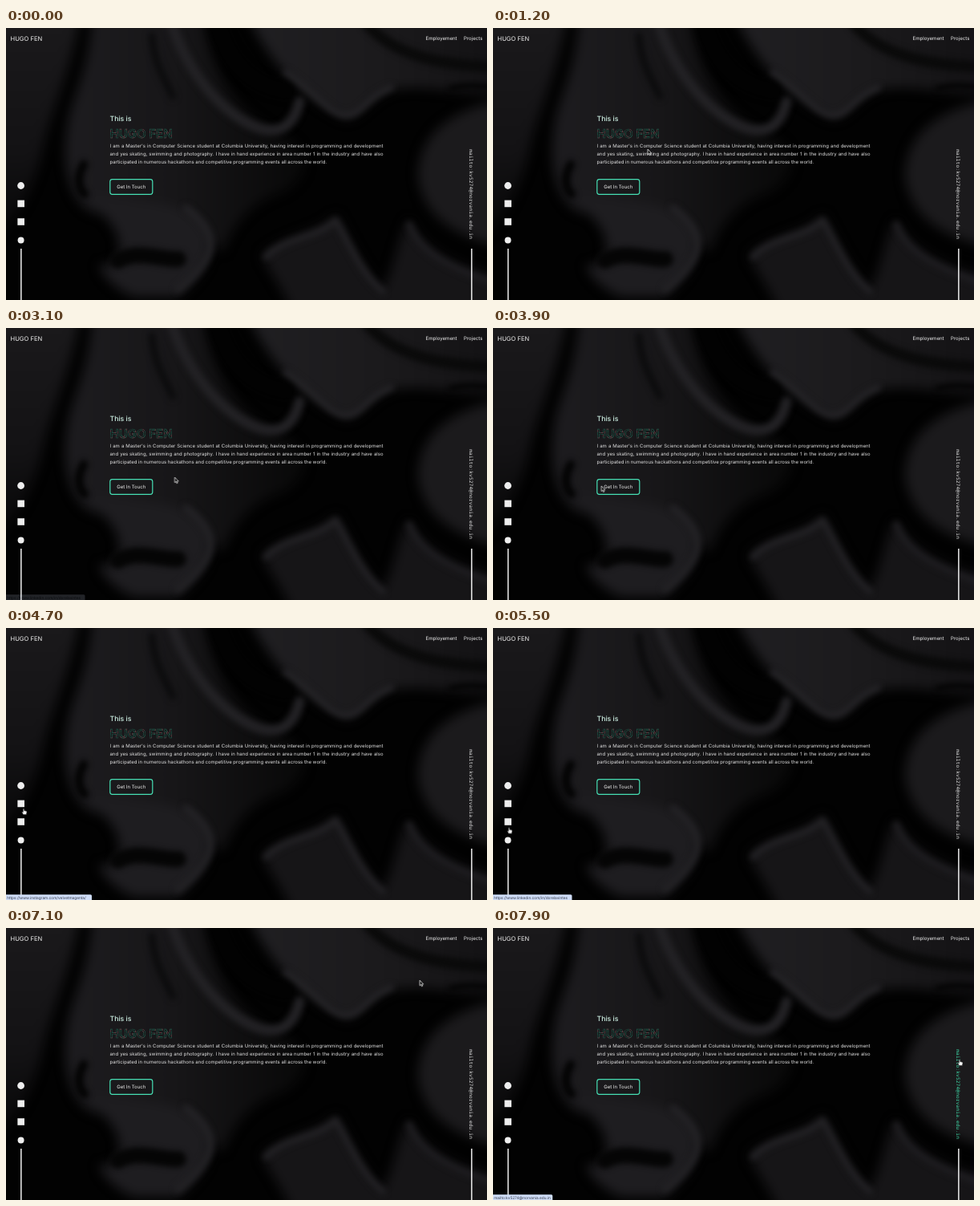
Write an HTML page that moves like this. It is 600 px wide and 339 px high and loops after 8000 ms.

```html
<!DOCTYPE html>
<html lang="en">
<head>
<meta charset="utf-8">
<title>Portfolio</title>
<style>
html, body { margin: 0; width: 100%; height: 100%; overflow: hidden; background: #020202; }
svg { position: absolute; left: 0; top: 0; width: 600px; height: 339px; }
text, p {
  font-family: Inter, Roboto, sans-serif; fill: #f2f2f2; color: #e2e2e2;
  text-rendering: geometricPrecision;
}
p {
  position: absolute; left: 129.5px; top: 143.4px; width: 341px; margin: 0;
  font-size: 6px; line-height: 9.7px; white-space: nowrap;
}
p span { display: block; text-align-last: justify; }
p span:last-child { text-align-last: left; }

.outline text { font-size: 15px; font-weight: 600; fill: none; stroke-width: .6; }
.mail { font: 500 6.1px "Noto Sans Mono", monospace; letter-spacing: .2px; }
.tip { opacity: 0; }
.tip rect { fill: #d0def8; }
.tip text { font-size: 4.75px; fill: #33384a; }

.button, .label, .mail, .tip, .cursor, .arrow, .hand { animation: 8s linear infinite; }
.button { animation-name: button; }
.label { animation-name: label; }
.mail { animation-name: mail; }
.cursor { animation-name: move; }
.arrow { animation-name: arrow; }
.hand { animation-name: hand; }
.tip.work { animation-name: work; }
.tip.photo { animation-name: photo; }
.tip.code { animation-name: code; }
.tip.write { animation-name: write; }

@keyframes button {
  0%, 29.3% { fill: #46f5c000; }
  29.4%, 35% { fill: #46f5c0; }
  35.1%, 100% { fill: #46f5c000; }
}
@keyframes label {
  0%, 29.3% { fill: #f2f2f2; }
  29.4%, 35% { fill: #123c32; }
  35.1%, 100% { fill: #f2f2f2; }
}
@keyframes mail {
  0%, 98.2% { fill: #e4e4e4; }
  98.3%, 100% { fill: #3fdcaa; }
}
@keyframes work {
  0%, 31.5% { opacity: 0; }
  33.5%, 36.4% { opacity: 1; }
  39.2%, 64.9% { opacity: 0; }
  65%, 69.9% { opacity: 1; }
  70%, 100% { opacity: 0; }
}
@keyframes photo {
  0%, 56% { opacity: 0; }
  57.5%, 64.9% { opacity: 1; }
  65%, 100% { opacity: 0; }
}
@keyframes code {
  0%, 69.9% { opacity: 0; }
  70%, 80.5% { opacity: 1; }
  83.7%, 100% { opacity: 0; }
}
@keyframes write {
  0%, 98.2% { opacity: 0; }
  98.3%, 100% { opacity: 1; }
}
@keyframes arrow {
  0%, 1.2% { opacity: 0; }
  1.25%, 29.3% { opacity: 1; }
  29.4%, 35% { opacity: 0; }
  35.1%, 56% { opacity: 1; }
  56.1%, 76% { opacity: 0; }
  76.1%, 98.2% { opacity: 1; }
  98.3%, 100% { opacity: 0; }
}
@keyframes hand {
  0%, 29.3% { opacity: 0; }
  29.4%, 35% { opacity: 1; }
  35.1%, 56% { opacity: 0; }
  56.1%, 76% { opacity: 1; }
  76.1%, 98.2% { opacity: 0; }
  98.3%, 100% { opacity: 1; }
}
@keyframes move {
  0%, 1.25% { transform: translate(120px, 0); }
  5% { transform: translate(150px, 64px); }
  10% { transform: translate(184px, 136px); }
  15% { transform: translate(193px, 151px); }
  21.25%, 25% { transform: translate(194px, 166px); }
  28.5% { transform: translate(182px, 187px); }
  31.25% { transform: translate(174px, 196px); }
  34.5% { transform: translate(180px, 198px); }
  36.5% { transform: translate(202px, 190px); }
  38.75% { transform: translate(210.5px, 186px); }
  42.5% { transform: translate(204px, 188px); }
  47% { transform: translate(165px, 193px); }
  52.5% { transform: translate(72px, 205px); }
  56.25% { transform: translate(25px, 216px); }
  58.75% { transform: translate(22px, 225px); }
  65%, 66.25% { transform: translate(20px, 239px); }
  72.5%, 73.75% { transform: translate(20px, 263px); }
  76% { transform: translate(70px, 243px); }
  78% { transform: translate(206px, 194px); }
  80% { transform: translate(344.5px, 144px); }
  82.3% { transform: translate(444px, 80px); }
  83.75%, 86.25% { transform: translate(475px, 56px); }
  89% { transform: translate(520px, 66px); }
  92.5% { transform: translate(582px, 94px); }
  94.5% { transform: translate(589px, 114px); }
  97.5% { transform: translate(580px, 138px); }
  98.75%, 100% { transform: translate(582px, 164px); }
}
</style>
</head>
<body>
<svg viewBox="0 0 600 339">
  <defs>
    <filter id="soft" x="-30%" y="-30%" width="160%" height="160%" color-interpolation-filters="sRGB"><feGaussianBlur stdDeviation="7"/></filter>
    <filter id="fine" x="-30%" y="-30%" width="160%" height="160%" color-interpolation-filters="sRGB"><feGaussianBlur stdDeviation="3.5"/></filter>
    <linearGradient id="body">
      <stop stop-color="#1d1c1f"/><stop offset=".45" stop-color="#171618"/><stop offset="1" stop-color="#080808"/>
    </linearGradient>
    <linearGradient id="top">
      <stop stop-color="#201f22"/><stop offset=".5" stop-color="#1b1a1c"/><stop offset="1" stop-color="#121113"/>
    </linearGradient>
    <linearGradient id="left" x2="0" y2="1">
      <stop stop-color="#1b1a1c"/><stop offset=".6" stop-color="#131214"/><stop offset="1" stop-color="#050505"/>
    </linearGradient>
  </defs>

  <!-- dark folded cloth -->
  <rect width="600" height="339" fill="#020202"/>
  <g filter="url(#soft)">
    <path d="M-30-30H95C85 40 62 90 48 140C38 190 20 240-30 275Z" fill="url(#left)"/>
    <path d="M108-30H245C250 50 285 105 340 130C380 150 385 180 345 205C310 215 285 240 270 280L225 235C180 225 130 245 100 225C75 205 68 160 79 108C92 65 106 40 108-30Z" fill="url(#body)"/>
    <path d="M295-30H630V82C560 85 520 68 480 78C450 90 440 116 422 113C385 95 330 55 295-30Z" fill="url(#top)"/>
    <path d="M630 88C560 98 514 130 514 185C520 235 560 262 630 275Z" fill="#1b1a1c"/>
    <path d="M100 205C160 220 215 210 245 245C265 270 255 300 215 335H160C135 325 122 310 115 295C135 300 150 280 135 250Z" fill="#1e1d20"/>
    <path d="M318 283C350 255 390 255 412 232C430 265 445 300 470 325C485 300 490 255 503 238C520 275 560 300 630 312V360H360C345 325 330 305 318 283Z" fill="#161517"/>
  </g>
  <g filter="url(#fine)" fill="none" stroke-linecap="round" stroke-linejoin="round">
    <path d="M205-10C222 45 258 95 300 118S360 118 366 92" stroke="#222124" stroke-width="13"/>
    <path d="M263-10C275 40 305 72 348 78" stroke="#020202" stroke-width="24"/>
    <path d="M182 10C184 40 195 60 208 85" stroke="#0c0c0d" stroke-width="9"/>
    <path d="M97 170C88 185 90 200 98 207" stroke="#030303" stroke-width="11"/>
    <path d="M140 290C165 275 195 290 215 288" stroke="#050505" stroke-width="20"/>
    <path d="M225 225C262 255 270 280 215 325" stroke="#222124" stroke-width="10"/>
    <path d="M350 55C385 80 405 108 424 108S450 85 480 74" stroke="#242326" stroke-width="8"/>
    <path d="M450-5C480 30 530 45 600 48" stroke="#0a0a0a" stroke-width="14"/>
    <path d="M555 75C575 70 590 72 610 74" stroke="#020202" stroke-width="6"/>
    <path d="M325 285C350 260 390 262 411 240C428 270 445 310 470 328" stroke="#222124" stroke-width="8"/>
    <path d="M503 245C515 280 555 300 610 318" stroke="#1e1d20" stroke-width="8"/>
  </g>

  <text x="5.5" y="15.7" font-size="7.6">HUGO FEN</text>
  <text x="523.5" y="15.1" font-size="6.1">Employement</text>
  <text x="571" y="15.1" font-size="6.1">Projects</text>

  <text x="129.5" y="115.9" font-size="8.7" font-weight="500" style="fill:#d2f5e8">This is</text>
  <g class="outline">
    <text x="129.5" y="137" stroke="#1c6350">HUGO FEN</text>
    <text x="129.5" y="137" stroke="#72303d" stroke-dasharray="3 9">HUGO FEN</text>
    <text x="129.5" y="137" stroke="#202224" stroke-dasharray="2 10" stroke-dashoffset="5">HUGO FEN</text>
  </g>

  <rect class="button" x="129.8" y="188.7" width="53" height="18.6" rx="2.8" stroke="#46dfb4" stroke-width="1.2"/>
  <text class="label" x="156.2" y="200.2" font-size="6" text-anchor="middle">Get In Touch</text>

  <g fill="#eee">
    <circle cx="18.6" cy="196.5" r="4.4"/>
    <rect x="14.4" y="214.6" width="8.6" height="8.6"/>
    <rect x="14.4" y="237.2" width="8.6" height="8.6"/>
    <circle cx="18.6" cy="264.5" r="4"/>
    <rect x="18.1" y="275" width="1.5" height="64"/>
    <rect x="580.1" y="275" width="1.5" height="64"/>
  </g>
  <text class="mail" transform="translate(578.2 151.2) rotate(90)">mailto:kv5274@norvania.edu.in</text>
</svg>

<p>
  <span>I am a Master's in Computer Science student at Columbia University, having interest in programming and development</span>
  <span>and yes skating, swimming and photography. I have in hand experience in area number 1 in the industry and have also</span>
  <span>participated in numerous hackathons and competitive programming events all across the world.</span>
</p>

<svg viewBox="0 0 600 339">
  <g class="tip work"><rect x="-2" y="332.2" width="100.5" height="9" rx="1.5"/><text x="1.2" y="337.7">https://www.linkedin.com/in/dorelavintes</text></g>
  <g class="tip photo"><rect x="-2" y="332.2" width="109" height="9" rx="1.5"/><text x="1.2" y="337.7">https://www.instagram.com/velvetmagenta/</text></g>
  <g class="tip code"><rect x="-2" y="332.2" width="76.3" height="9" rx="1.5"/><text x="1.2" y="337.7">https://github.com/dorelavintes</text></g>
  <g class="tip write"><rect x="-2" y="332.2" width="76.3" height="9" rx="1.5"/><text x="1.2" y="337.7">mailto:kv5274@norvania.edu.in</text></g>

  <g class="cursor">
    <path class="arrow" d="M0 0V6.6L1.5 5.3L2.5 7.6L3.6 7.1L2.6 4.9H4.6Z" fill="#050505" stroke="#f0f0f0" stroke-width=".8"/>
    <path class="hand" d="M-.7.5Q0-.4.7.5V2.6L3.2 3.1Q4.1 3.4 4 4.4L3.4 7.4H-.4L-2.3 4.6Q-2.2 3.6-.7 4.6Z" fill="#f4f4f4" stroke="#111" stroke-width=".5"/>
  </g>
</svg>
</body>
</html>
```
